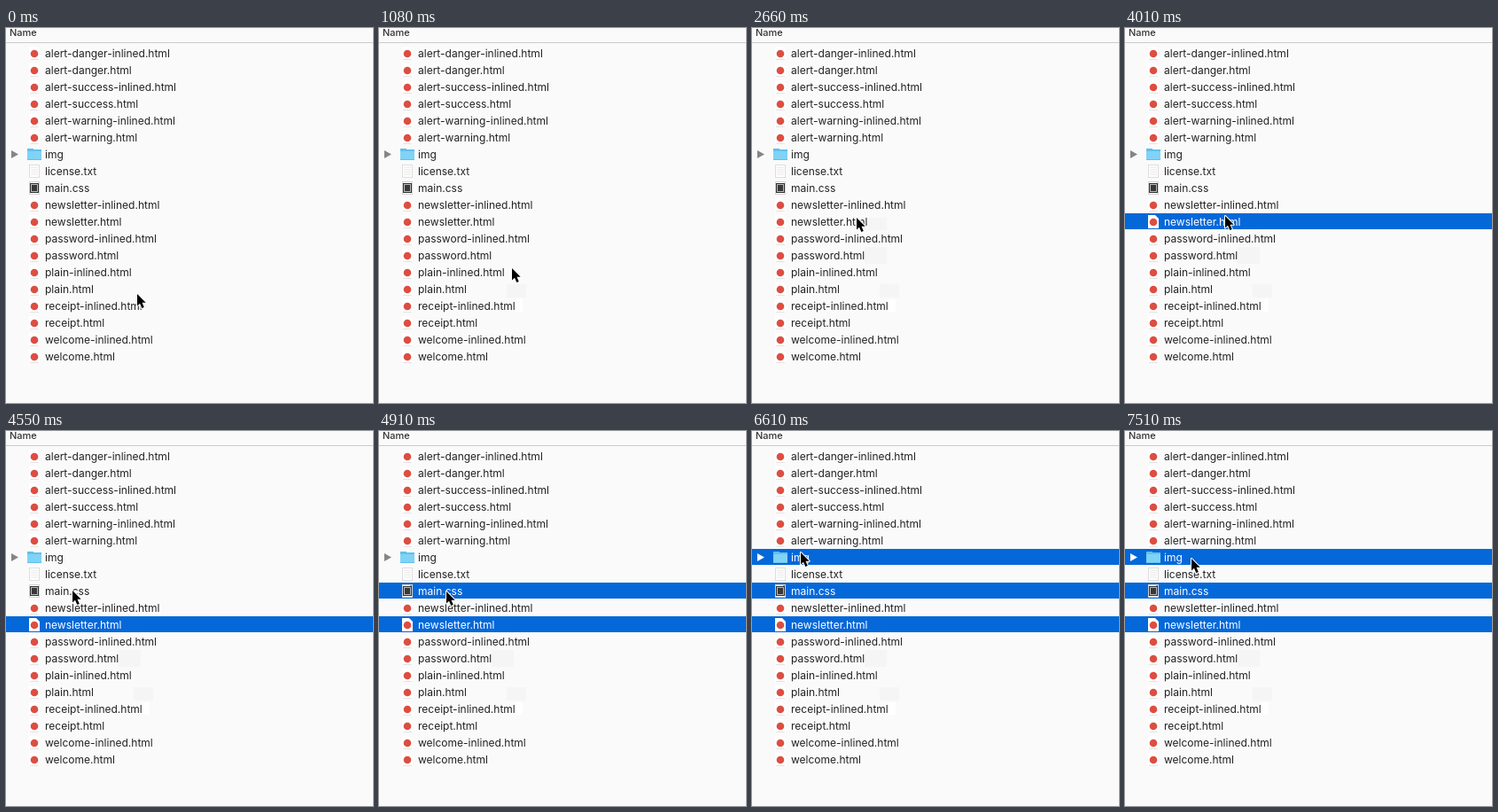
These frames come from a looping animation (414x423 px, 8000 ms). An HTML page with a canvas:

```html
<!DOCTYPE html>
<html lang="en">
<head>
<meta charset="utf-8">
<title>File list selection</title>
<style>
  html, body { margin: 0; width: 100%; height: 100%; overflow: hidden; background: #fafafa; }
  canvas { display: block; }
</style>
</head>
<body>
<canvas id="stage" width="414" height="423"></canvas>
<script>
const ctx = document.getElementById('stage').getContext('2d');
const LOOP = 8000;
const ROW = 19;
const BLUE = '#0568d9';

const files = [
  'alert-danger-inlined.html', 'alert-danger.html',
  'alert-success-inlined.html', 'alert-success.html',
  'alert-warning-inlined.html', 'alert-warning.html',
  'img', 'license.txt', 'main.css',
  'newsletter-inlined.html', 'newsletter.html',
  'password-inlined.html', 'password.html',
  'plain-inlined.html', 'plain.html',
  'receipt-inlined.html', 'receipt.html',
  'welcome-inlined.html', 'welcome.html'
];

// When each file becomes selected, in ms
const selectedAt = { 'newsletter.html': 2840, 'main.css': 4910, 'img': 6610 };

// Pointer moves: steps are spread evenly from start to end, each one a hard jump
const moves = [
  { start: 0, end: 0, steps: 1, from: [147, 299], to: [147, 299] },
  { start: 990, end: 1080, steps: 2, from: [151, 286], to: [149, 270] },
  { start: 1530, end: 1790, steps: 4, from: [146, 263], to: [131, 233] },
  { start: 1870, end: 1960, steps: 2, from: [135, 227], to: [138, 222] },
  { start: 2400, end: 2660, steps: 4, from: [135, 219], to: [117, 213] },
  { start: 4010, end: 4370, steps: 5, from: [112, 211], to: [74, 178] },
  { start: 4550, end: 4640, steps: 2, from: [74, 179], to: [75, 180] },
  { start: 5630, end: 5630, steps: 1, from: [75, 181], to: [75, 181] },
  { start: 5810, end: 6070, steps: 4, from: [70, 169], to: [54, 136] },
  { start: 7060, end: 7060, steps: 1, from: [54, 136], to: [54, 136] },
  { start: 7510, end: 7510, steps: 1, from: [74, 143], to: [74, 143] }
];

// Faint smudges the pointer leaves behind
const smudges = [
  { at: 1080, box: [144, 289, 22, 15], color: '#f5f5f5' },
  { at: 1080, box: [154, 306, 8, 14], color: '#fff' },
  { at: 1790, box: [127, 247, 25, 19], color: '#f5f5f5' },
  { at: 2400, box: [131, 214, 21, 14], color: '#f5f5f5' },
  { at: 5980, box: [54, 138, 21, 13], color: '#f5f5f5' }
];

function rect(color, x, y, w, h) {
  ctx.fillStyle = color;
  ctx.fillRect(x, y, w, h);
}

function polygon(color, points) {
  ctx.beginPath();
  points.forEach(([x, y]) => ctx.lineTo(x, y));
  ctx.closePath();
  ctx.fillStyle = color;
  ctx.fill();
}

function text(string, x, y, font, color) {
  ctx.font = `${font} Inter, sans-serif`;
  ctx.fillStyle = color;
  ctx.fillText(string, x, y);
}

function page(top, edge) {
  polygon('#fff', [[26, top + 2], [34, top + 2], [38, top + 6], [38, top + 17], [26, top + 17]]);
  if (!edge) return;
  ctx.strokeStyle = edge;
  ctx.lineWidth = 1;
  ctx.strokeRect(26.5, top + 2.5, 11, 14);
}

const icons = {
  html(top, selected) {
    page(top);
    if (!selected) rect('#e4e4e4', 27, top + 16, 10, 1);
    ctx.beginPath();
    ctx.arc(32, top + 10, 4.3, 0, 2 * Math.PI);
    ctx.fillStyle = '#dc4e41';
    ctx.fill();
  },
  txt(top) {
    page(top, '#dedede');
    for (let y = 5; y < 15; y += 2) rect('#ececec', 28, top + y, 8, 1);
  },
  css(top) {
    page(top, '#d4d4d4');
    rect('#303030', 27, top + 4, 10, 11);
    rect('#bbb', 28, top + 5, 8, 9);
    rect('#383838', 29, top + 6, 6, 7);
  },
  folder(top, selected) {
    polygon(selected ? '#fff' : '#858585', [[6, top + 5], [14, top + 9.5], [6, top + 14]]);
    rect('#5fbce8', 24, top + 3, 7, 3);
    rect('#62c1ec', 24, top + 4, 16, 12);
    rect('#7fd3f7', 24, top + 6, 16, 9);
  }
};

function drawRow(name, index, t) {
  const top = ROW * (index + 1);
  const selected = t >= selectedAt[name];
  if (selected) rect(BLUE, 0, top, 414, 18);
  const kind = name.includes('.') ? name.split('.').pop() : 'folder';
  icons[kind](top, selected);
  text(name, 44, top + 14, '12px', selected ? '#fff' : '#222');
}

function pointerAt(t) {
  const { start, end, steps, from, to } = moves.filter(m => m.start <= t).pop();
  if (steps === 1) return to;
  const gap = (end - start) / (steps - 1);
  const step = Math.min(steps - 1, Math.floor((t - start) / gap + 0.06));
  return from.map((v, i) => Math.round(v + (to[i] - v) * step / (steps - 1)));
}

function drawPointer([x, y]) {
  ctx.save();
  ctx.translate(x, y);
  const arrow = [[1, 1], [1, 14.5], [4, 11.7], [6.3, 17], [8.8, 16], [6.5, 10.8], [10.7, 10.8]];
  polygon('#000', arrow);
  ctx.strokeStyle = '#fff';
  ctx.lineWidth = 2;
  ctx.lineJoin = 'round';
  ctx.stroke();
  polygon('#000', arrow);
  ctx.restore();
}

function draw(t) {
  rect('#fafafa', 0, 0, 414, 423);
  text('Name', 4, 9, '500 11px', '#333');
  rect('#cbcbcb', 0, 16, 414, 1);
  for (const { at, box, color } of smudges) {
    if (t >= at) rect(color, ...box);
  }
  files.forEach((name, index) => drawRow(name, index, t));
  drawPointer(pointerAt(t));
}

function tick() {
  draw(performance.now() % LOOP);
  requestAnimationFrame(tick);
}
tick();
</script>
</body>
</html>
```
